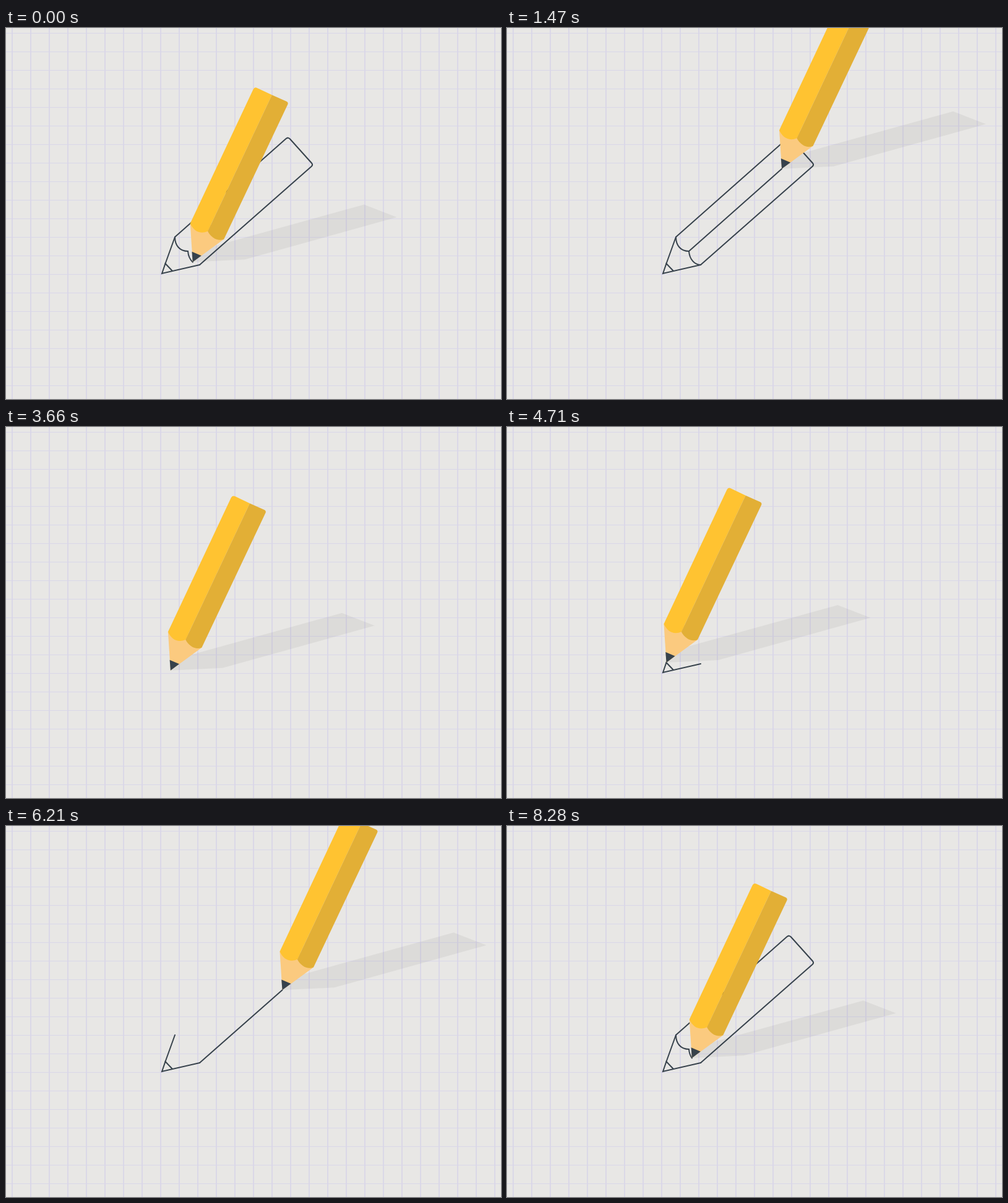
Recreate the animation shown at these times as an HTML page. Size 800x600 px, loop 8310 ms.

```html
<!DOCTYPE html>
<html lang="en">
<head>
<meta charset="utf-8">
<title>Pencil drawing a pencil</title>
<style>
  html, body { margin: 0; width: 100%; height: 100%; overflow: hidden; background: #e8e7e5; }
  svg { display: block; width: 800px; height: 600px; }
  #outline path { fill: none; stroke: #37424c; stroke-width: 2; stroke-linecap: round; stroke-linejoin: miter; }
</style>
</head>
<body>
<svg viewBox="0 0 800 600">
  <defs>
    <pattern id="grid" width="30" height="30" patternUnits="userSpaceOnUse">
      <path d="M0 8.5H30" stroke="#dad8e8" stroke-width="1.2"/>
      <path d="M10 0V30" stroke="#d9d6e8" stroke-width="1.8"/>
    </pattern>
    <!-- Lying pose, tip at 252,397 -->
    <g id="shape">
      <path fill="#fbca7f" d="M252 397L273 338L300 345L313 383Z"/>
      <path fill="#ffc331" d="M273 338L452.5 179Q456 176 459 179.5L476.5 199.5L294 361C281 361 273 352 273 338Z"/>
      <path fill="#e2af36" d="M294 361L476.5 199.5L494 218.5Q496.500 221.500 493.500 224L313 383C303 383 295 374 294 361Z"/>
      <path fill="#37424c" d="M252 397L257.500 381L269 393Z"/>
    </g>
  </defs>
  <rect width="800" height="600" fill="#e8e7e5"/>
  <rect width="800" height="600" fill="url(#grid)"/>
  <g id="outline"></g>
  <use id="fresh" href="#shape"/>
  <path id="shadow" fill="#000" fill-opacity=".05" d="M0 0L30 -24.600L277 -93L330 -72.500L84 -4Z"/>
  <use id="pencil" href="#shape"/>
</svg>
<script>
  const LOOP = 8310, LIFT_AT = 2490, LIFT = 1000, DRAW_END = 7505;
  const TIP = { x: 252, y: 397 }, TILT = -23.3;

  // Times count from the moment the pencil starts to rise.
  const strokes = [
    ["M269 393L257.5 381L252 397L313 383", 1235, 1720],
    ["M257.5 381L273 338", 2220, 2565],
    ["M313 383L493.5 224Q496.5 221.5 494 218.5L459 179.5Q456 176 452.5 179L273 338", 2838, 5550],
    ["M273 338C273 352 281 361 294 361", 5550, 5688],
    ["M294 361C295 374 303 383 313 383", 5688, 5905],
    ["M294 361L476 199.5", 6285, DRAW_END]
  ].map(([d, from, to]) => {
    const path = document.createElementNS("http://www.w3.org/2000/svg", "path");
    path.setAttribute("d", d);
    outline.append(path);
    const length = path.getTotalLength();
    const at = k => path.getPointAtLength(length * k);
    return { path, from, to, length, at };
  });

  const clamp = k => Math.min(1, Math.max(0, k));
  const span = (t, from, to) => clamp((t - from) / (to - from));
  const smooth = k => k * k * (3 - 2 * k);
  const outBack = k => 1 + 2.70158 * (k - 1) ** 3 + 1.70158 * (k - 1) ** 2;
  const mix = (a, b, k) => ({ x: a.x + (b.x - a.x) * k, y: a.y + (b.y - a.y) * k });

  function tipAt(t) {
    let last = TIP, since = LIFT;
    for (const s of strokes) {
      if (t < s.from) return mix(last, s.at(0), smooth(span(t, since, s.from)));
      if (t < s.to) return s.at(span(t, s.from, s.to));
      last = s.at(1);
      since = s.to;
    }
    const k = span(t, DRAW_END, DRAW_END + 700);
    return { x: last.x + 80 * k, y: last.y + 720 * k * k };
  }

  function draw(t) {
    const tip = tipAt(t), rise = span(t, 0, LIFT);
    const angle = TILT * outBack(rise);
    const fill = span(t, DRAW_END, DRAW_END + 400);

    pencil.setAttribute("transform",
      `translate(${tip.x} ${tip.y}) rotate(${angle}) translate(${-TIP.x} ${-TIP.y})`);
    const size = 1 - (1 - rise) ** 1.2;
    shadow.setAttribute("transform", `translate(${tip.x} ${tip.y}) scale(${size})`);
    fresh.setAttribute("opacity", fill);
    outline.setAttribute("opacity", 1 - span(t, DRAW_END + 300, DRAW_END + 600));

    for (const s of strokes) {
      const k = span(t, s.from, s.to);
      s.path.style.visibility = k ? "visible" : "hidden";
      s.path.style.strokeDasharray = k < 1 ? `${s.length * k} 9999` : "none";
    }
  }

  const start = performance.now();
  function tick() {
    const t = performance.now() - start;
    draw((t + LOOP - LIFT_AT) % LOOP);
    requestAnimationFrame(tick);
  }
  tick();
</script>
</body>
</html>
```
